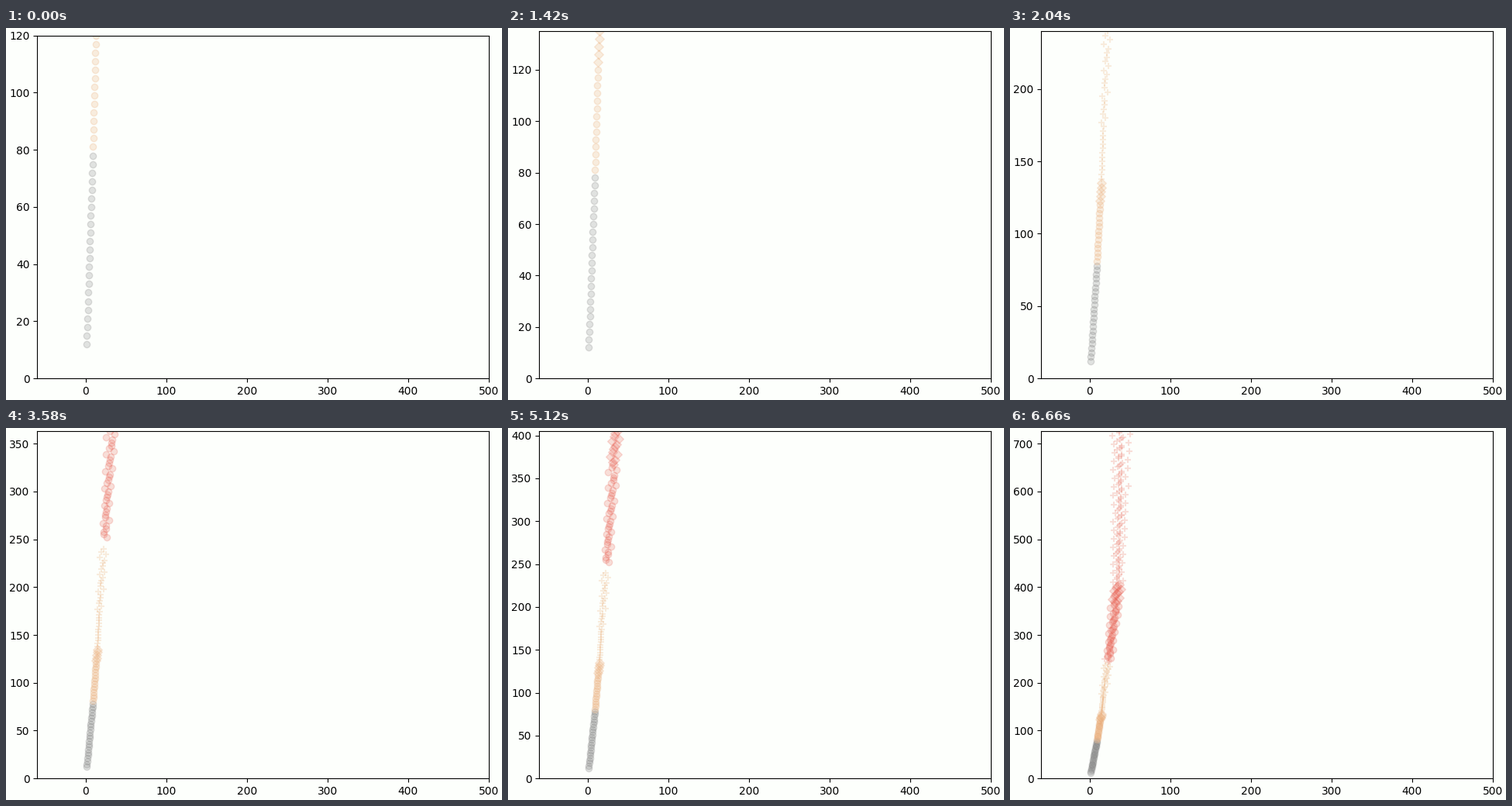
A matplotlib script for the animation above (8 s loop, 640 by 480 pixels).

```python
import numpy as np
import matplotlib.pyplot as plt
from matplotlib.animation import FuncAnimation

W, H, DPI = 640, 480, 100
STEP, LOOP = 20, 8000          # ms
PAPER = "#fdfffc"
GREY, ORANGE, RED = "#707070", "#e8a064", "#e85a4b"

STARTS = [0, 500, 2040, 3580, 5120, 6660]
LIMITS = [120, 135, 240, 363, 405, 726]

# stage, first row, last row, marker, colour
SERIES = [
    (0, 4, 26, "o", GREY),
    (0, 27, 40, "o", ORANGE),
    (1, 41, 45, "D", ORANGE),
    (2, 46, 80, "+", ORANGE),
    (3, 84, 121, "o", RED),
    (4, 122, 135, "D", RED),
    (5, 81, 83, "+", RED),
    (5, 136, 242, "+", RED),
]


def counts(rows, rng):
    """Rising trend plus a six-row wave that widens with the row number."""
    trend = np.interp(rows, [4, 26, 40, 45, 80, 100, 135, 242],
                      [1.1, 9, 13, 15, 22, 27, 35, 39.5])
    wave = np.array([1, -0.3, -0.1, 0.1, 0.25, -1])[rows % 6]
    swing = np.where(rows > 57, rows / 25, 0)
    noise = rng.normal(0, 0.12, len(rows))
    return np.round(trend + swing * (wave + noise))


fig = plt.figure(figsize=(W / DPI, H / DPI), dpi=DPI, facecolor=PAPER,
                 layout="constrained")
ax = fig.add_subplot(facecolor=PAPER)

rng = np.random.default_rng(3)
dots = []
for stage, first, last, marker, color in SERIES:
    rows = np.arange(first, last + 1)
    dots.append((stage, ax.scatter(counts(rows, rng), 3 * rows,
                                   marker=marker, color=color, alpha=0.2)))
ax.set_xlim(-60, 500)


def fitted_box(limit):
    ax.set_ylim(0, limit)
    fig.draw_without_rendering()
    return ax.get_position().frozen()


# lay out each stage once, then keep the boxes
boxes = [fitted_box(limit) for limit in LIMITS]
fig.set_layout_engine("none")


def update(i):
    now = sum(start <= i * STEP for start in STARTS) - 1
    ax.set_position(boxes[now])
    ax.set_ylim(0, LIMITS[now])
    for stage, group in dots:
        group.set_visible(stage <= now)
    return [group for _, group in dots]


anim = FuncAnimation(fig, update, frames=LOOP // STEP, interval=STEP,
                     repeat=True, repeat_delay=0, blit=False)
plt.show()
```
